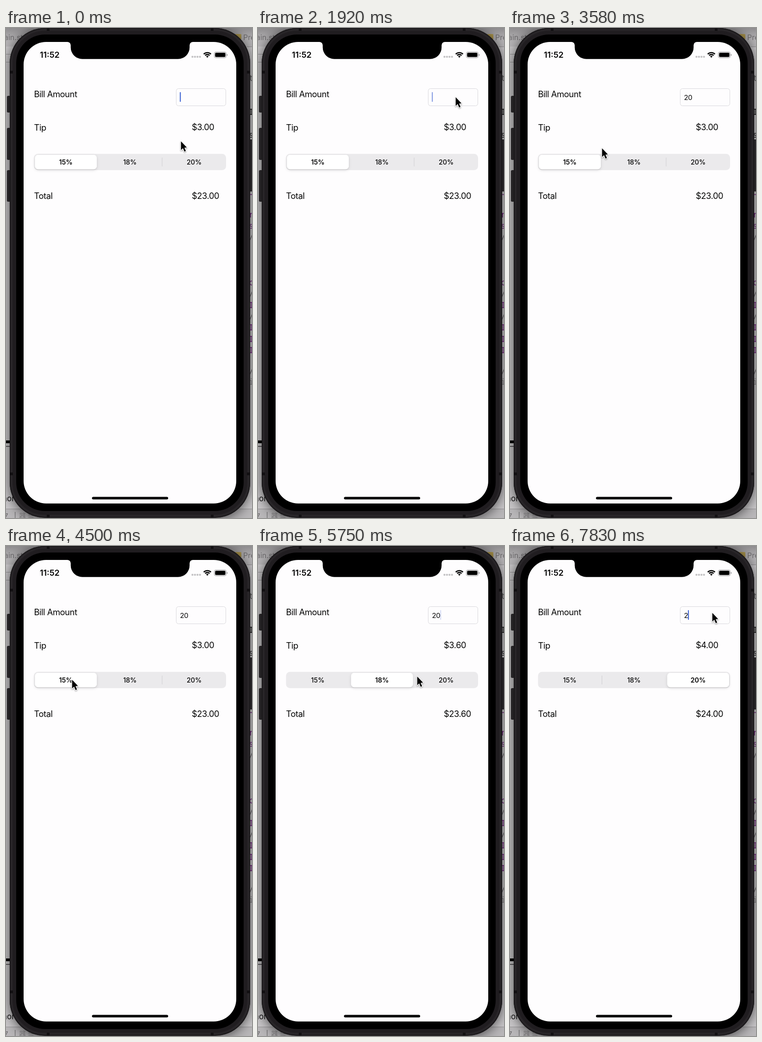
Write an HTML page with a canvas that moves like this. It is 531 px wide and 1055 px high and loops after 8000 ms.

```html
<!DOCTYPE html>
<html lang="en">
<head>
<meta charset="utf-8">
<title>Tip calculator</title>
<style>
html, body { margin: 0; width: 100%; height: 100%; overflow: hidden; background: #b4b2b4; }
canvas { display: block; width: 531px; height: 1055px; }
</style>
</head>
<body>
<canvas id="stage"></canvas>
<script>
const W = 531, H = 1055, LOOP = 8000;
const SANS = 'Inter, "Liberation Sans", sans-serif';
const MONO = '"DejaVu Sans Mono", monospace';
const canvas = document.getElementById('stage');
const dpr = window.devicePixelRatio || 1;
let ctx;

const clamp = v => Math.max(0, Math.min(1, v));
const ramp = (t, start, length) => clamp((t - start) / length);
const smooth = u => u * u * (3 - 2 * u);
const easeOut = u => 1 - (1 - u) * (1 - u);

function prepare(c) {
  c.width = W * dpr;
  c.height = H * dpr;
  const g = c.getContext('2d');
  g.scale(dpr, dpr);
  return g;
}

function rect(x, y, w, h, color) {
  ctx.fillStyle = color;
  ctx.fillRect(x, y, w, h);
}

function round(x, y, w, h, r, color) {
  ctx.beginPath();
  ctx.roundRect(x, y, w, h, r);
  ctx.fillStyle = color;
  ctx.fill();
}

function text(str, x, y, size, { weight = 400, color = '#050505', align = 'left', gap = 0, family = SANS } = {}) {
  ctx.font = `${weight} ${size}px ${family}`;
  ctx.letterSpacing = gap + 'px';
  ctx.textAlign = align;
  ctx.fillStyle = color;
  ctx.fillText(str, x, y);
}

const label = (str, x, y) => text(str, x, y, 18.3, { gap: -0.42 });

function withShadow(color, blur, dy, draw) {
  ctx.save();
  ctx.shadowColor = color;
  ctx.shadowBlur = blur * dpr;
  ctx.shadowOffsetY = dy * dpr;
  draw();
  ctx.restore();
}

function drawDesktop() {
  rect(0, 0, W, H, '#c9c7c9');
  const bar = ctx.createLinearGradient(0, 0, 0, 40);
  bar.addColorStop(0, '#8f8d8f');
  bar.addColorStop(0.6, '#b4b2b4');
  bar.addColorStop(1, '#bab8ba');
  rect(0, 0, W, 40, bar);
  rect(0, 56, 12, 1, '#8d8b8d');
  rect(0, 73, 12, 1, '#8d8b8d');
  rect(520, 40, 11, 1, '#8d8b8d');
  text('ain.st', -4, 26, 16, { color: '#6d6b6d' });
  round(494, 13, 14, 12, 2, '#a8924a');
  text('Pre', 512, 26, 16, { color: '#6d6b6d' });

  const code = (str, y, color) => text(str, 524, y, 17, { color, family: MONO });
  code('t', 114, '#555');
  code('I', 187, '#111');
  code('s', 236, '#111');
  [['-', 363], ['r', 408], ['s', 432], ['c', 554], ['I', 603], ['I', 651], ['I', 676], ['I', 700]]
    .forEach(([s, y]) => code(s, y, '#71227c'));
  [457, 579, 628, 746].forEach(y => code('/', y, '#686668'));
  code('i', 768, '#858385');

  rect(0, 888, 12, 6, '#050505');
  rect(0, 900, 12, 1.5, '#3a383a');
  text('nor', -8, 1019, 17, { color: '#111' });
  rect(0, 1035, W, 20, '#b9b7b9');
  rect(0, 1035, W, 1, '#949294');
  text('7   |', -4, 1056, 15, { color: '#686668' });
  text('器 ≡', 28, 1056, 15, { color: '#858385', family: '"Noto Sans CJK SC", sans-serif' });
}

function drawPhone() {
  withShadow('rgba(0,0,0,.62)', 26, 3, () => round(8, 0, 519, 1054.5, 76, '#1c1a1c'));
  [[2, 146, 36], [2, 215, 69], [2, 306, 68], [524, 240, 112]]
    .forEach(([x, y, h]) => round(x, y, 9, h, 2.5, '#242224'));
  round(8, 0, 519, 1054.5, 76, '#1a181a');
  round(10, 2, 515, 1050.5, 74, '#282528');
  round(14, 6, 507, 1042, 70, '#201d20');
  [95, 960].forEach(y => {
    rect(8, y - 3, 7, 6, '#121012');
    rect(520, y - 3, 7, 6, '#121012');
  });
  [88, 442].forEach(x => {
    rect(x, 0, 6, 6, '#121012');
    rect(x, 1048, 6, 6, '#121012');
  });
  round(22, 14, 491, 1026, 62, '#000');
  round(38, 30, 459, 993.8, 48.5, '#fefdfe');

  ctx.beginPath();
  ctx.moveTo(132.5, 29);
  ctx.lineTo(132.5, 30);
  ctx.arcTo(139.7, 30, 139.7, 38, 7.2);
  ctx.arcTo(139.7, 66.7, 170, 66.7, 25);
  ctx.arcTo(396.3, 66.7, 396.3, 38, 25);
  ctx.arcTo(396.3, 30, 403.5, 30, 7.2);
  ctx.lineTo(403.5, 29);
  ctx.fillStyle = '#000';
  ctx.fill();
  round(185.6, 1009.6, 164.4, 5.5, 2.75, '#000');
}

function drawStatus() {
  text('11:52', 73, 64.3, 17.8, { weight: 600 });
  for (let i = 0; i < 4; i++) round(400.5 + i * 5.4, 60, 4, 4, 1.2, '#c5c4c6');

  ctx.strokeStyle = '#050505';
  const wave = (r, width) => {
    ctx.lineWidth = width;
    ctx.beginPath();
    ctx.arc(434.6, 64, r, -Math.PI * 0.75, -Math.PI * 0.25);
    ctx.stroke();
  };
  wave(11, 2.7);
  wave(6.9, 2.6);
  wave(1.9, 3.8);

  ctx.lineWidth = 1;
  ctx.strokeStyle = '#9b9a9c';
  ctx.beginPath();
  ctx.roundRect(449.5, 51.5, 26, 12.8, 3.6);
  ctx.stroke();
  round(451.3, 53.3, 22.4, 9.2, 2.2, '#000');
  round(476.6, 56, 1.6, 4, 1, '#9b9a9c');
}

function drawForm() {
  label('Bill Amount', 60.5, 148.7);
  label('Tip', 60.5, 220.5);
  label('Total', 60.5, 368);
  ctx.lineWidth = 1;
  ctx.strokeStyle = '#d9d8dc';
  ctx.beginPath();
  ctx.roundRect(367.5, 130.5, 107, 37, 5);
  ctx.stroke();
  round(60.5, 271, 414.5, 35, 8.5, '#ebeaec');
}

// Time, x, y of the pointer tip
const path = [
  [80, 411, 144], [1330, 411, 144], [1750, 426, 148],
  [3260, 426, 148], [3580, 198, 258], [3700, 198, 258], [3960, 142, 287],
  [4600, 142, 287], [4960, 262, 287], [5450, 262, 287],
  [5750, 343, 280], [5960, 379, 281], [6680, 379, 281], [7080, 436, 143]
];

function pointerAt(t) {
  if (t < 80) return [377, 243];
  const i = path.findIndex(k => k[0] > t);
  if (i < 0) return path[path.length - 1].slice(1);
  const [t0, x0, y0] = path[i - 1], [t1, x1, y1] = path[i];
  const u = smooth((t - t0) / (t1 - t0));
  return [x0 + (x1 - x0) * u, y0 + (y1 - y0) * u];
}

function drawPointer(t) {
  const [x, y] = pointerAt(t);
  ctx.save();
  ctx.translate(x + 0.7, y + 1);
  ctx.scale(0.94, 0.94);
  ctx.beginPath();
  [[0, 0], [0, 20], [4.5, 15.8], [8, 23.6], [11.2, 22.2], [7.8, 14.6], [13.4, 14.2]]
    .forEach(([px, py]) => ctx.lineTo(px, py));
  ctx.closePath();
  ctx.lineJoin = 'round';
  ctx.lineWidth = 2.6;
  ctx.strokeStyle = '#fff';
  withShadow('rgba(0,0,0,.35)', 3, 1.5, () => ctx.stroke());
  ctx.fillStyle = '#000';
  ctx.fill();
  ctx.restore();
}

function caretAlpha(t) {
  if (t < 1300 || (t >= 2750 && t < 3300) || t >= 7750) return 1;
  const p = t % 1000;
  if (p < 90) return clamp((p + 1000 - 665) / 400);
  if (p < 700) return 1 - smooth(ramp(p, 300, 200));
  return clamp((p - 665) / 400);
}

function drawField(t) {
  const value = t < 2750 ? '' : t < 2920 || t >= 7750 ? '2' : '20';
  text(value, 375.4, 154.7, 15, { gap: -0.3 });
  const x = 375.2 + ctx.measureText(value).width;
  ctx.globalAlpha = caretAlpha(t);
  round(x, 138, 2.1, 21, 1, '#3d63d2');
  ctx.globalAlpha = 1;
}

const PICKS = [5060, 6100];
const RATES = [15, 18, 20];

function drawSegments(t, choice) {
  const slide = PICKS.reduce((sum, start) => sum + easeOut(ramp(t, start, 300)), 0);
  const press = smooth(ramp(t, 3960, 120)) - smooth(ramp(t, 4240, 160));
  const scale = 1 - 0.055 * press;
  const w = 133.6 * scale, h = 31.4 * scale;
  const cx = 129.2 + slide * 138.5, cy = 288.6;

  if (choice === 0) rect(336.5, 279, 1, 19, '#cfced2');
  ctx.globalAlpha = ramp(t, PICKS[1], 300);
  rect(198, 279, 1, 19, '#cfced2');
  ctx.globalAlpha = 1;

  const pill = () => round(cx - w / 2, cy - h / 2, w, h, 7, '#fff');
  withShadow('rgba(0,0,0,.13)', 6, 2, pill);
  withShadow('rgba(0,0,0,.1)', 1, 1, pill);
  RATES.forEach((rate, i) => {
    text(rate + '%', 129 + i * 138.5, 294, 14.3, { weight: i === choice ? 600 : 500, align: 'center' });
  });
}

function drawPaste(t) {
  if (t < 1170 || t > 1720) return;
  ctx.globalAlpha = 1 - ramp(t, 1460, 250);
  ctx.beginPath();
  ctx.roundRect(337.5, 176, 77.5, 39, 8.5);
  ctx.moveTo(365.5, 176.5);
  ctx.lineTo(376, 166);
  ctx.lineTo(386.5, 176.5);
  ctx.fillStyle = '#000';
  ctx.fill();
  text('Paste', 376, 201, 15, { color: '#f3f3f3', align: 'center' });
  ctx.globalAlpha = 1;
}

const backdrop = document.createElement('canvas');
const still = prepare(backdrop);
const live = prepare(canvas);

ctx = still;
[drawDesktop, drawPhone, drawStatus, drawForm].forEach(draw => draw());
ctx = live;

function frame(now) {
  const t = now % LOOP;
  const choice = PICKS.filter(start => t >= start).length;
  const tip = 20 * RATES[choice] / 100;
  ctx.drawImage(backdrop, 0, 0, W, H);
  drawField(t);
  label('$' + tip.toFixed(2), 401, 219.5);
  label('$' + (20 + tip).toFixed(2), 401, 368);
  drawSegments(t, choice);
  drawPaste(t);
  drawPointer(t);
}

const start = performance.now();
function tick() {
  frame(performance.now() - start);
  requestAnimationFrame(tick);
}
tick();
</script>
</body>
</html>
```
